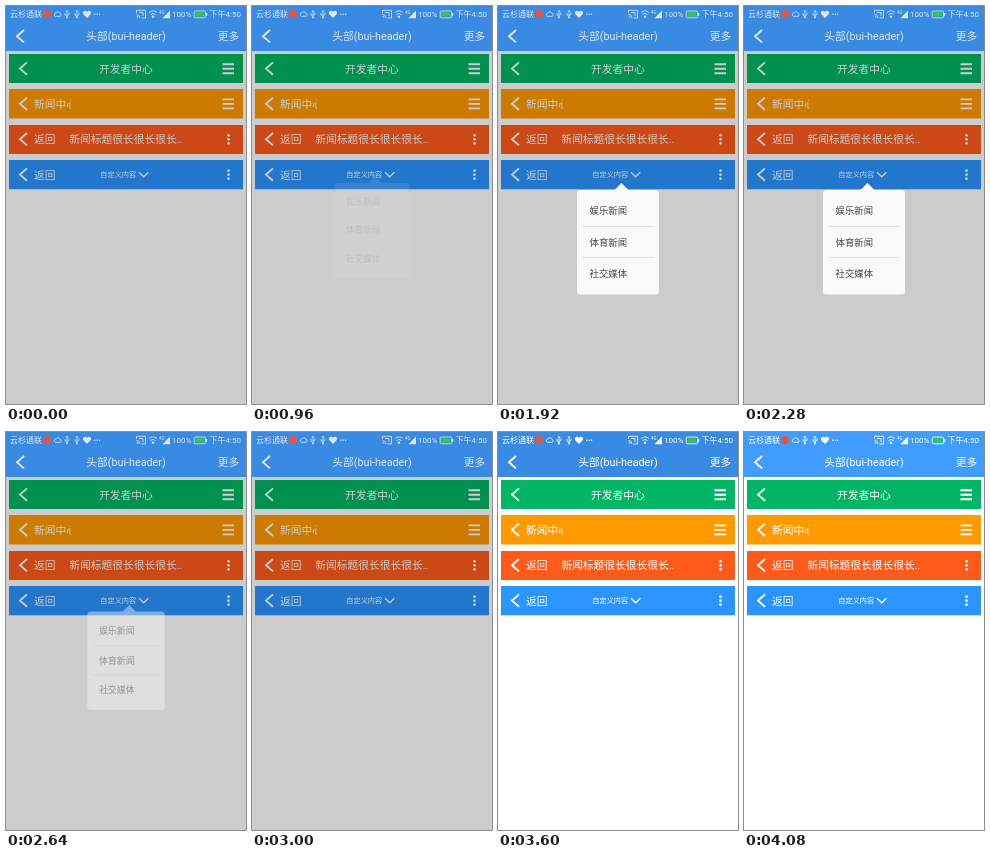
An HTML page for the animation above (4.2 s loop, 240x398 px).

```html
<!DOCTYPE html>
<html lang="zh-CN">
<head>
<meta charset="utf-8">
<title>bui-header</title>
<style>
html, body { margin: 0; width: 100%; height: 100%; overflow: hidden; background: #fff; }
svg { display: block; width: 240px; height: 398px; }
text { font: 10.75px Roboto, "Noto Sans CJK SC", "Noto Sans CJK", sans-serif; fill: currentColor; }
.line { fill: none; stroke: currentColor; stroke-width: 1.9; }
.thin { fill: none; stroke: currentColor; stroke-width: .8; }
.status text { font-size: 8px; }
.small { font-size: 7.2px; }
.menu text { font-size: 9.4px; fill: #444; }
</style>
</head>
<body>
<svg viewBox="0 0 240 398">
  <defs>
    <path id="back" class="line" d="M7 0L0 6.2L7 12.4"/>
    <path id="burger" class="line" d="M0 0h11.5M0 4.5h11.5M0 9h11.5"/>
    <g id="more" fill="currentColor">
      <circle r="1.35"/><circle cy="4" r="1.35"/><circle cy="8" r="1.35"/>
    </g>
    <g id="usb">
      <path class="thin" d="M0 -3.5V3.5M-2 -1V1L0 2.5M2 -1.5V.3L0 1.6M-1 -2.3L0 -3.7L1 -2.3"/>
      <circle cy="3.4" r=".9" fill="currentColor"/>
    </g>
    <clipPath id="clipNews"><rect x="28" y="83" width="37" height="30"/></clipPath>
    <clipPath id="clipTitle"><rect x="64" y="119" width="113" height="30"/></clipPath>
  </defs>

  <rect width="240" height="398" fill="#fff"/>

  <g color="#fff">
    <rect x="3" y="48" width="234" height="29" fill="#00b564"/>
    <use href="#back" x="14" y="56.4"/>
    <text x="120" y="66.6" text-anchor="middle">开发者中心</text>
    <use href="#burger" x="216.5" y="58.2"/>

    <rect x="3" y="83" width="234" height="29.5" fill="#ff9a00"/>
    <use href="#back" x="14" y="91.6"/>
    <text x="28" y="101.8" clip-path="url(#clipNews)">新闻中心</text>
    <use href="#burger" x="216.5" y="93.4"/>

    <rect x="3" y="119" width="234" height="29" fill="#ff5a19"/>
    <use href="#back" x="14" y="127"/>
    <text x="28" y="137.2">返回</text>
    <text x="63.2" y="137.2" clip-path="url(#clipTitle)">新闻标题很长很长很长..</text>
    <use href="#more" x="222.5" y="129.3"/>

    <rect x="3" y="154" width="234" height="29.3" fill="#2a94ff"/>
    <use href="#back" x="14" y="162.4"/>
    <text x="28" y="172.6">返回</text>
    <text class="small" x="94.3" y="171.3">自定义内容</text>
    <path class="line" style="stroke-width:1.2" d="M133 166.2L137.7 170.8L142.4 166.2"/>
    <use href="#more" x="222.5" y="164.7"/>
  </g>

  <rect id="dim" y="45" width="240" height="353" opacity=".2"/>

  <g id="head">
    <rect id="headBg" width="240" height="45"/>
    <g class="status">
      <text x="4" y="11.2">云杉通联</text>
      <circle cx="41" cy="8" r="3.9" fill="#e8533f"/>
      <path class="thin" d="M49.5 10.3a1.8 1.8 0 0 1 .3 -3.4a2.2 2.2 0 0 1 4 .3a1.6 1.6 0 0 1 .2 3.1z"/>
      <use href="#usb" x="61" y="8"/>
      <use href="#usb" x="71" y="8"/>
      <path fill="currentColor" d="M81 12L77.4 8.2C75.6 5.6 79.4 3.4 81 6C82.6 3.4 86.4 5.6 84.6 8.2Z"/>
      <g fill="currentColor">
        <circle cx="88.8" cy="8.3" r=".7"/><circle cx="91.2" cy="8.3" r=".7"/><circle cx="93.6" cy="8.3" r=".7"/>
      </g>
      <path class="thin" d="M130.5 7V4.3H139.5V12H135.5M130.5 8.5a3.5 3.5 0 0 1 3.5 3.5M130.5 10.3a1.7 1.7 0 0 1 1.7 1.7M133 6.5h4v3.5"/>
      <path class="thin" d="M143 6.6Q147 3 151 6.6M144.4 8.6Q147 6.2 149.6 8.6"/>
      <circle cx="147" cy="10.7" r="1.2" fill="currentColor"/>
      <text x="153" y="7.5" style="font-size:4.5px">4G</text>
      <path fill="currentColor" d="M156.5 12.2H164V4.5Z"/>
      <text x="166" y="11">100%</text>
      <rect x="188.2" y="5" width="11.4" height="6.8" rx="1" class="thin"/>
      <rect x="189.4" y="6.2" width="9" height="4.4" fill="#35c64a"/>
      <rect x="200" y="7" width="1.2" height="2.8" fill="currentColor"/>
      <text x="203.6" y="11.2">下午4:50</text>
    </g>
    <use href="#back" x="11" y="24"/>
    <text x="120" y="34.2" text-anchor="middle">头部(bui-header)</text>
    <text x="211.7" y="34.2">更多</text>
  </g>

  <g id="menu" class="menu">
    <path d="M116 184.5L123.5 177L131 184.5Z" fill="#fafafa"/>
    <rect x="79" y="184" width="82" height="104.5" rx="3.5" fill="#fafafa"/>
    <path d="M84 220.5H156M84 251.5H156" stroke="#e2e2e2" stroke-width="1"/>
    <text x="91.5" y="207.9">娱乐新闻</text>
    <text x="91.5" y="239.5">体育新闻</text>
    <text x="91.5" y="270.9">社交媒体</text>
  </g>
</svg>
<script>
const LOOP = 4200, STEP = 120, LIGHT_AT = 3600;
const $ = id => document.getElementById(id);

// [time, value] steps
const menuSteps = [[840, 0], [960, .1], [1200, .26], [1920, 1], [2280, 1], [2640, .42], [3000, 0]];
const headSteps = [[3600, 0], [4080, 1]];

function valueAt(steps, t) {
  if (t <= steps[0][0]) return steps[0][1];
  for (let i = 1; i < steps.length; i++) {
    const [t0, a] = steps[i - 1], [t1, b] = steps[i];
    if (t <= t1) return a + (b - a) * (t - t0) / (t1 - t0);
  }
  return steps[steps.length - 1][1];
}

const mix = (from, to, k) => `rgb(${from.map((v, i) => Math.round(v + (to[i] - v) * k))})`;

function draw(t) {
  const lit = t >= LIGHT_AT;
  $('dim').setAttribute('visibility', lit ? 'hidden' : 'visible');
  $('head').setAttribute('color', lit ? '#fff' : '#dfe6ee');
  $('headBg').setAttribute('fill', mix([56, 138, 226], [64, 157, 255], valueAt(headSteps, t)));

  const p = valueAt(menuSteps, t), menu = $('menu');
  menu.setAttribute('opacity', p);
  menu.setAttribute('transform',
    `translate(120 ${236 - 13 * (1 - p)}) scale(${.9 + .1 * p}) translate(-120 -236)`);
}

const start = performance.now();
function tick() {
  const t = (performance.now() - start) % LOOP;
  draw(Math.floor(t / STEP) * STEP);
  requestAnimationFrame(tick);
}
tick();
</script>
</body>
</html>
```
